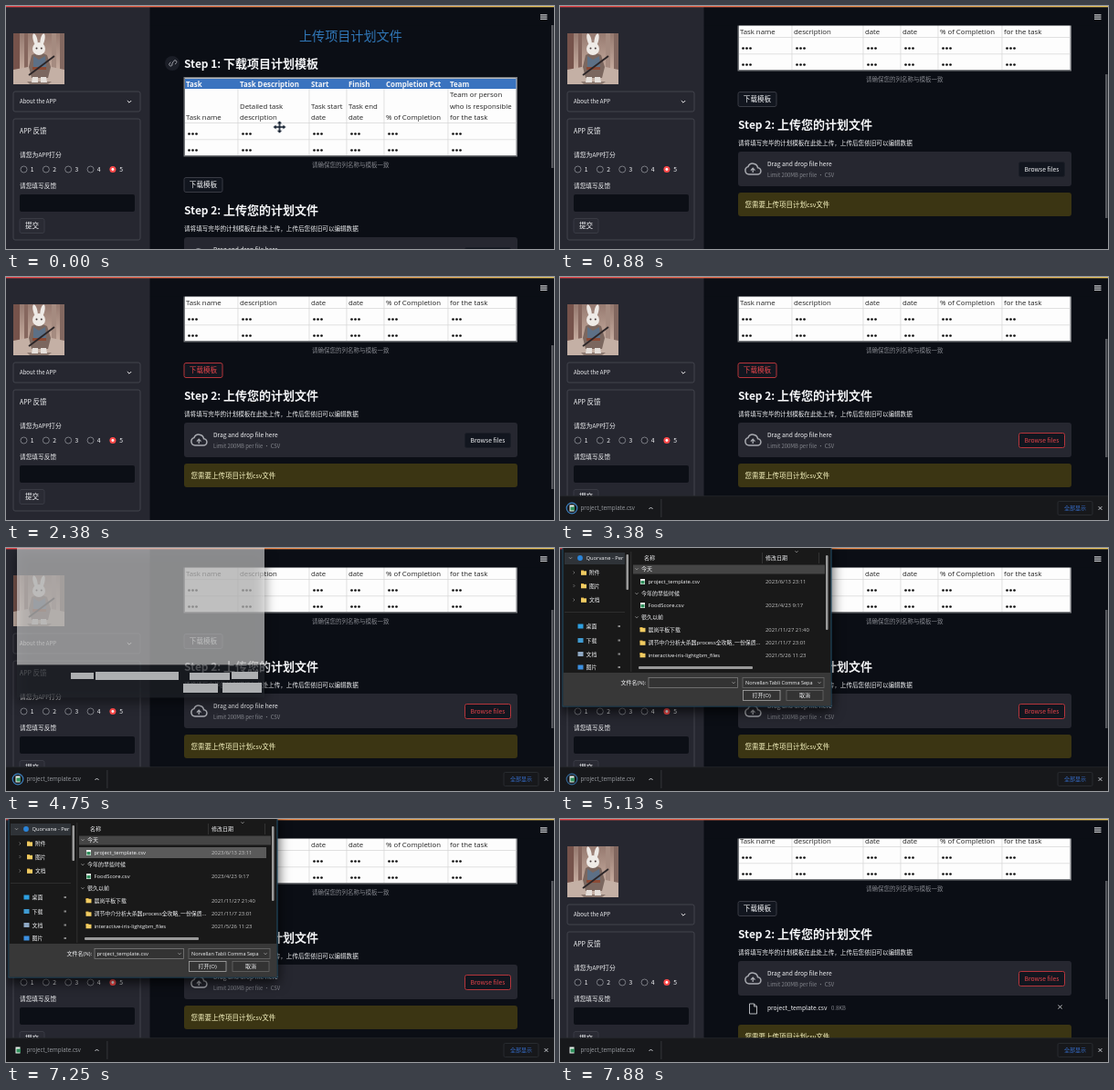
Animation, 600 px wide and 267 px high, one loop 8000 ms. Source, as an HTML page:

```html
<!DOCTYPE html>
<html lang="zh-CN">
<head>
<meta charset="utf-8">
<title>上传项目计划文件</title>
<style>
html, body { margin: 0; width: 100%; height: 100%; overflow: hidden; background: #0b0e15; }
svg { display: block; width: 100%; height: 100%; }
text { font-family: "Noto Sans CJK SC", "Noto Sans CJK", sans-serif; fill: #f4f5f7; white-space: pre; }
.ui text, text.ui { font-family: "Open Sans", "Noto Sans CJK SC", "Noto Sans CJK", sans-serif; }
.latin { font-size: .92em; }
.dim { fill: #85878e; }
.ink { fill: #222; }
.bold { font-weight: 700; }
.mid { font-weight: 500; }
.line { fill: none; stroke: #c9cbd0; stroke-width: 1; }
.btn rect { fill: #12161f; stroke: #393b44; }
.btn.plain rect { fill: #2a2b34; }
.soft { filter: drop-shadow(0 5px 7px rgba(0, 0, 0, .75)); }

.scroll, .thumb, .cursor, .black, .shelf, .ring, .ghost, .dialog, .picked, .uploaded, .warn, .dl, .browse {
  animation: 8s step-end infinite;
}
.scroll { animation-name: scroll; animation-timing-function: linear; }
.thumb { animation-name: thumb; animation-timing-function: linear; }
.cursor { animation-name: cursor; }
.black { animation-name: black; }
.shelf { animation-name: shelf; animation-timing-function: ease-out; }
.ring { animation-name: ring; }
.ghost { animation-name: ghost; }
.dialog { animation-name: dialog; }
.picked { animation-name: picked; }
.uploaded { animation-name: uploaded; }
.warn { animation-name: warn; }
.dl rect, .dl text, .browse rect, .browse text { animation: inherit; }
.dl rect { animation-name: dl-edge; }
.dl text { animation-name: dl-text; }
.browse rect { animation-name: browse-edge; }
.browse text { animation-name: browse-text; }
.pulse { animation: pulse calc(8s / 17) -410ms ease-in-out infinite; }

@keyframes scroll {
  0%, 1.2% { transform: translateY(0); animation-timing-function: ease-in-out; }
  10.8%, 95.2% { transform: translateY(-94px); }
  95.25%, 100% { transform: translateY(-98px); }
}
@keyframes thumb {
  0%, 1.2% { y: 21px; height: 157px; animation-timing-function: ease-in-out; }
  10.8%, 30% { y: 75px; height: 158px; }
  32.5%, 100% { y: 68px; height: 130px; }
}
@keyframes cursor { 0% { opacity: 1 } 10.8%, 100% { opacity: 0 } }
@keyframes black { 0% { opacity: 0 } 21.8% { opacity: 1 } 26.6%, 100% { opacity: 0 } }
@keyframes shelf { 0%, 30% { transform: translateY(27px) } 32.5%, 100% { transform: none } }
@keyframes ring { 0% { opacity: 1 } 71.8%, 100% { opacity: 0 } }
@keyframes pulse { 0%, 100% { opacity: 1 } 50% { opacity: .3 } }
@keyframes ghost { 0% { opacity: 0 } 59.3% { opacity: 1 } 60.9%, 100% { opacity: 0 } }
@keyframes dialog { 0% { opacity: 0 } 60.9% { opacity: 1 } 92.2%, 100% { opacity: 0 } }
@keyframes picked { 0% { opacity: 0 } 84.3%, 100% { opacity: 1 } }
@keyframes uploaded { 0% { opacity: 0 } 95.25%, 100% { opacity: 1 } }
@keyframes warn { 0% { transform: none } 95.25%, 100% { transform: translateY(25px) } }
@keyframes dl-edge { 0% { stroke: #393b44 } 18.7% { stroke: #b5353b } 45.3%, 100% { stroke: #393b44 } }
@keyframes dl-text { 0% { fill: #f4f5f7 } 18.7% { fill: #e5444a } 45.3%, 100% { fill: #f4f5f7 } }
@keyframes browse-edge { 0% { stroke: #1b1e27 } 39%, 100% { stroke: #b5353b } }
@keyframes browse-text { 0% { fill: #f4f5f7 } 39%, 100% { fill: #e5444a } }
</style>
</head>
<body>
<svg id="stage" viewBox="0 0 600 267" xmlns="http://www.w3.org/2000/svg"></svg>
<script>
// y is the vertical middle of the text line
const text = (x, y, size, str, cls = '', attrs = '') => {
  const mixed = /[^ -~]/.test(str) && !/\bui\b/.test(cls);
  const body = mixed ? str.replace(/[ -~]+/g, s => `<tspan class="latin">${s}</tspan>`) : str;
  return `<text x="${x}" y="${y + size * .37}" font-size="${size}" class="${cls}" ${attrs}>${body}</text>`;
};
const rect = (x, y, w, h, fill, attrs = '') =>
  `<rect x="${x}" y="${y}" width="${w}" height="${h}" fill="${fill}" ${attrs}/>`;
const path = (d, attrs = '') => `<path class="line" d="${d}" ${attrs}/>`;
const dot = (x, y, r, fill, attrs = '') => `<circle cx="${x}" cy="${y}" r="${r}" fill="${fill}" ${attrs}/>`;
const at = (x, y, body, cls = '') => `<g transform="translate(${x} ${y})"><g class="${cls}">${body}</g></g>`;
const button = (x, y, w, h, label, size, cls = '') => `<g class="btn ${cls}">
  ${rect(x + .5, y + .5, w - 1, h - 1, '', 'rx="2"')}
  ${text(x + w / 2, y + h / 2, size, label, 'mid', 'text-anchor="middle"')}</g>`;
const cross = (x, y, r = 2) => path(`M${x - r} ${y - r}l${2 * r} ${2 * r}m0 ${-2 * r}l${-2 * r} ${2 * r}`, 'stroke="#eee"');

const columns = [
  [197, 'Task', ['Task name']],
  [256, 'Task Description', ['Detailed task', 'description']],
  [334, 'Start', ['Task start', 'date']],
  [375, 'Finish', ['Task end', 'date']],
  [416, 'Completion Pct', ['% of Completion']],
  [486, 'Team', ['Team or person', 'who is responsible', 'for the task']],
];

function table() {
  const cells = columns.map(([x, head, lines], i) => {
    const ellipses = [140.5, 158.5].map(y =>
      [4, 8, 12].map(dx => dot(x + dx - .5, y, 1.35, '#111')).join('')).join('');
    const body = lines.map((s, n) => text(x, 122 - 12.2 * (lines.length - 1 - n), 7.8, s, 'ink')).join('');
    return (i ? rect(x - 2.4, 91, .7, 73, '#d4d4d4') : '') + text(x, 85.8, 7.9, head, 'bold') + body + ellipses;
  });
  return `<g class="ui">${rect(194.5, 78, 365.5, 87.5, '#77797d')}${rect(196, 79.5, 362.5, 84.5, '#fdfdfd')}
    ${rect(196, 80, 362.5, 11, '#3a73bf')}
    ${rect(196, 128, 362.5, .7, '#d4d4d4')}${rect(196, 146.5, 362.5, .7, '#d4d4d4')}${cells.join('')}</g>`;
}

function content() {
  const cloud = path('M207 185h9a3.6 3.6 0 0 0 .6-7.2a5.6 5.6 0 0 0-10.7-1.2a4.3 4.3 0 0 0 1.1 8.4z', 'style="stroke:#a9abb1;stroke-width:1.5"')
    + path('M211.2 183v-4.6m-2.3 2.2l2.3-2.4l2.3 2.4', 'style="stroke:#a9abb1;stroke-width:1.3"');
  const uploaded = path('M207.5 207h5l3 3v8h-8zm5 0v3h3', 'style="stroke:#b5b7bc"')
    + text(227, 211.5, 6.65, 'project_template.csv', 'mid') + text(297, 211.5, 5.9, '0.8KB', 'dim') + cross(547.5, 210.5);
  return `<g class="scroll">
    ${text(321, 32.5, 14.1, '上传项目计划文件', '', 'style="fill:#3077b8"')}
    ${dot(182, 63, 8, '#1b1e27')}
    ${path('M181 64.8l2.2-3.4m-2.8 .2l-1.3 1.5a1.7 1.7 0 0 0 2.6 2.3l.8-.9m.3-3l1-1.2a1.7 1.7 0 0 1 2.6 2.3l-1.3 1.5', 'style="stroke:#9a9ca3"')}
    ${text(195, 63, 13, 'Step 1: 下载项目计划模板', 'bold')}
    ${table()}
    ${text(335, 174.3, 6.5, '请确保您的列名称与模板一致', 'dim')}
    <g transform="translate(0 94)">
      ${button(194.5, 94, 43, 17, '下载模板', 7.6, 'dl')}
      ${text(195, 130.3, 13, 'Step 2: 上传您的计划文件', 'bold')}
      ${text(195, 151, 6.59, '请将填写完毕的计划模板在此处上传，上传后您依旧可以编辑数据')}
      ${rect(195, 160, 365, 38, '#262730', 'rx="3"')}${cloud}
      ${text(227, 173.5, 6.67, 'Drag and drop file here', 'mid')}
      ${text(227, 185.5, 5.9, 'Limit 200MB per file • CSV', 'dim ui', 'style="font-family:\'Noto Sans CJK SC\',sans-serif"')}
      ${button(502, 171, 51, 17, 'Browse files', 6.8, 'browse')}
      <g class="uploaded">${uploaded}</g>
      <g class="warn">${rect(195, 205, 365, 26, '#3b3513', 'rx="3"')}
        ${text(202.5, 218, 7.5, '您需要上传项目计划csv文件', 'mid', 'style="fill:#fbf8c4"')}</g>
    </g></g>`;
}

function portrait() {
  const shape = (d, fill) => `<path d="${d}" fill="${fill}"/>`;
  const ear = (x, turn) => `<ellipse cx="${x}" cy="7" rx="2.3" ry="7" fill="#eeeae6" transform="rotate(${turn} ${x} 7)"/>`;
  return at(8, 30, rect(0, 0, 56, 56, 'url(#hall)')
    + rect(0, 0, 7, 40, '#76534b') + rect(12, 0, 4, 38, '#86675e') + rect(42, 0, 5, 38, '#a58b80') + rect(51, 0, 5, 40, '#826860')
    + shape('M0 40L16 37H42L56 40V56H0z', '#c4b0a5')
    + shape('M15 53h27l-4 3h-20z', '#8d7a71')
    + shape('M20 24l8-4l9 4l4 13l-3 12h-18l-3-12z', '#7b675f')
    + shape('M22 25l6 4l7-4l1 12h-14z', '#5d7086')
    + shape('M21 37h15v3h-15z', '#8b4a35')
    + shape('M21 48h6v6h-7zm9 0h6l1 6h-7z', '#e5dfda')
    + '<ellipse cx="28" cy="17" rx="7" ry="7" fill="#efebe7"/>' + ear(24, -14) + ear(32, 12)
    + dot(25.5, 16.5, 1, '#493c3c') + dot(30.8, 16.5, 1, '#493c3c')
    + '<path d="M17 46L45 25" stroke="#2b2527" stroke-width="1.8"/>');
}

function sidebar() {
  const frame = (y, h) => rect(8, y, 139, h, 'none', 'stroke="#42444d" rx="2"');
  const radios = [1, 2, 3, 4, 5].map(n => {
    const x = 19.5 + (n - 1) * 24.35, on = n === 5;
    return dot(x, 179.5, 3.5, on ? '#ff4b4b' : '#20212a', on ? '' : 'stroke="#85878e" stroke-width=".9"')
      + (on ? dot(x, 179.5, 1.4, '#fff') : '') + text(x + 7.3, 179.5, 6.8, String(n), 'mid');
  }).join('');
  return rect(0, 0, 157.5, 267, '#262730') + portrait()
    + frame(94, 22) + text(15, 105, 6, 'About the APP', 'mid') + path('M132.8 104l2.2 2.2l2.2-2.2', 'style="stroke:#eee"')
    + frame(124, 133) + text(15, 137, 7.5, 'APP 反馈') + text(15, 163.5, 6.8, '请您为APP打分') + radios
    + text(15, 198, 6.7, '请您填写反馈') + rect(15, 207, 126, 19, '#0c0f16', 'rx="2"')
    + button(14.5, 233, 28, 17, '提交', 7.6, 'plain');
}

function shelf() {
  return `<g class="shelf ui">${rect(0, 240.5, 600, 26.5, '#17181b')}${rect(0, 240.5, 600, .6, '#2b2d31')}
    ${rect(10.5, 250.5, 5, 7, '#e9eeeb')}${rect(11.5, 252.5, 4.5, 4, '#2f8f5b')}
    <g class="ring"><circle class="pulse" cx="13" cy="254" r="5.8" fill="none" stroke="#3d83c4" stroke-width="1.2"/></g>
    ${text(22.5, 254, 6.2, 'project_template.csv', 'ui', 'style="fill:#9a9da2"')}
    ${path('M97.5 255l2-2l2 2')}${rect(110.5, 244, .8, 20, '#3c3e42')}
    ${rect(545, 246.5, 38, 15, 'none', 'stroke="#282b30" rx="1.5"')}
    ${text(552, 254, 6, '全部显示', 'ui', 'style="fill:#366fce"')}${cross(591.5, 254, 1.9)}</g>`;
}

function ghost() {
  const blocks = [[71, 137, 25, 7], [98, 136, 91, 9], [201, 137, 44, 8], [247, 136, 29, 8], [194, 149, 38, 10], [237, 148, 43, 11]];
  return `<g class="ghost"><g class="soft">
    ${rect(12, 0, 271, 128.5, '#e1e1e1', 'fill-opacity=".6"')}${rect(12, 128.5, 271, 36, '#24272d', 'fill-opacity=".6"')}</g>
    ${blocks.map(b => rect(...b, '#adafb1')).join('')}</g>`;
}

function dialog() {
  const folder = (x, y) => rect(x - 3, y - 2.5, 3, 2, '#d9a93c') + rect(x - 3, y - 1.7, 6, 4.5, '#f0cb62');
  const sheet = (x, y) => rect(x - 2.5, y - 3, 5, 6, '#eef2ef') + rect(x - 2, y - 1, 4, 3.4, '#2f8f5b');
  const caret = (x, y) => path(`M${x - 1.5} ${y - .7}l1.5 1.5l1.5-1.5`, 'style="stroke:#aaa;stroke-width:.8"');
  const box = (x, y, w, h, stroke, fill = '#333') => rect(x, y, w, h, fill, `stroke="${stroke}" stroke-width=".8"`);
  const bar = (x, y, w, h) => rect(x, y, w, h, '#9a9a9a', 'rx="1"');
  const nav = [['附件', 27], ['图片', 41.5], ['文档', 57]].map(([s, y]) =>
    path(`M14.5 ${y - 1.5}l1.5 1.5l-1.5 1.5`, 'style="stroke:#888;stroke-width:.7"') + folder(26, y) + text(32, y, 5.8, s, 'ui')).join('');
  const places = [['桌面', 86, '#2d9fe0'], ['下载', 101.5, '#3f9ad0'], ['文档', 116.5, '#8fa9c4'], ['图片', 131, '#3c8fe0']].map(([s, y, c]) =>
    rect(19.5, y - 2.5, 6, 5, c) + text(28.5, y, 5.9, s, 'ui') + rect(63.5, y - 1, 2.5, 2, '#888')).join('');
  const groups = [['今天', 23], ['今年的早些时候', 50], ['很久以前', 76]].map(([s, y]) =>
    caret(84, y) + text(89, y, 6, s, 'ui')).join('');
  const files = [
    [sheet, 'project_template.csv', '2023/6/13 23:11', 37],
    [sheet, 'FoodScore.csv', '2023/4/23 9:17', 63],
    [folder, '晨岚平板下载', '2021/11/27 21:40', 89.5],
    [folder, '调节中介分析大杀器process全攻略_一份保质...', '2021/11/7 23:01', 104],
    [folder, 'interactive-iris-lightgbm_files', '2021/5/26 11:23', 117.5],
  ].map(([icon, name, date, y]) => icon(90.5, y) + text(96.5, y, 5.9, name, 'ui')
    + text(225, y, 5.9, date, 'ui', 'style="fill:#c4c4c4"')).join('');
  return `<g class="dialog ui">${rect(3, -5, 294, 179, '#191919', 'class="soft" stroke="#23506a"')}
    ${rect(3.5, 137, 293, 36.5, '#383838')}
    ${rect(5, 5, 66, 13, '#2f3338')}${caret(11.5, 11)}${dot(22, 11, 2.9, '#2a84d8')}${text(28.5, 11, 5.8, 'Quorvane - Per', 'ui')}
    ${nav}${rect(5, 70, 66, .6, '#3c3c3c')}${places}
    ${bar(72.5, 7, 2.5, 39)}${rect(77.5, 4, .7, 132, '#3a3a3a')}
    ${text(92, 10.5, 6, '名称', 'ui')}${rect(221, 5, .6, 12, '#444')}${text(225, 10.5, 6, '修改日期', 'ui')}${caret(259, 4)}${rect(283, 5, .6, 12, '#444')}
    ${rect(80, 18.5, 210, 10, '#454545')}
    <g class="picked">${rect(80, 31, 205, 12, '#5a5a5a')}</g>
    ${groups}${files}
    ${bar(86, 130, 125, 3)}${bar(291, 8, 2.5, 82)}
    ${text(66.5, 147.5, 6, '文件名(N):', 'ui')}${box(97, 142.5, 97.5, 11, '#7c7c7c')}${caret(190, 148)}
    <g class="picked">${text(99.5, 148, 5.9, 'project_template.csv', 'ui')}</g>
    ${box(200, 142.5, 89, 11, '#6a6a6a')}${text(203, 148, 5.5, 'Norvellan Tabli Comma Sepa', 'ui')}${caret(284, 148)}
    ${box(200.5, 156.5, 40.5, 11, '#a8a8a8')}${text(220.7, 162, 6, '打开(O)', 'ui', 'text-anchor="middle"')}
    ${box(248, 156.5, 40, 11, '#666')}${text(268, 162, 6, '取消', 'ui', 'text-anchor="middle"')}</g>`;
}

function moveCursor() {
  const arm = '<path d="M-.8 0V-3.8H-2.6L0-6.8L2.6-3.8H.8V0z"/>';
  const arms = [0, 90, 180, 270].map(a => `<g transform="rotate(${a})">${arm}</g>`).join('');
  return at(299.5, 133, `<g fill="#fff" stroke="#fff" stroke-width="1.6">${arms}</g><g fill="#111c2c">${arms}</g>`, 'cursor');
}

const gradient = (id, vertical, stops) => `<linearGradient id="${id}" x2="${vertical ? 0 : 1}" y2="${vertical ? 1 : 0}">
  ${stops.map(([o, c]) => `<stop offset="${o}" stop-color="${c}"/>`).join('')}</linearGradient>`;

document.getElementById('stage').innerHTML = `<defs>
  ${gradient('glow', false, [[0, '#e8454b'], [.5, '#ee8b4d'], [1, '#e6c45f']])}
  ${gradient('hall', true, [[0, '#967a70'], [.7, '#c4aa9d'], [1, '#b09c92']])}
  </defs>
  ${rect(0, 0, 600, 267, '#0b0e15')}
  ${content()}
  ${rect(157, 0, 443, 21.5, '#0b0e15')}
  ${[9.8, 12, 14.2].map(y => rect(585, y - .5, 7.5, 1.1, '#e3e4e6')).join('')}
  ${rect(597, 21, 2.5, 157, '#55575d', 'class="thumb"')}
  ${sidebar()}
  ${rect(0, 0, 600, 1.3, 'url(#glow)')}
  ${shelf()}${ghost()}${dialog()}${moveCursor()}
  <g class="black">${rect(0, 0, 600, 267, '#020204')}${rect(0, 0, 600, 1, '#303032')}</g>`;
</script>
</body>
</html>
```
